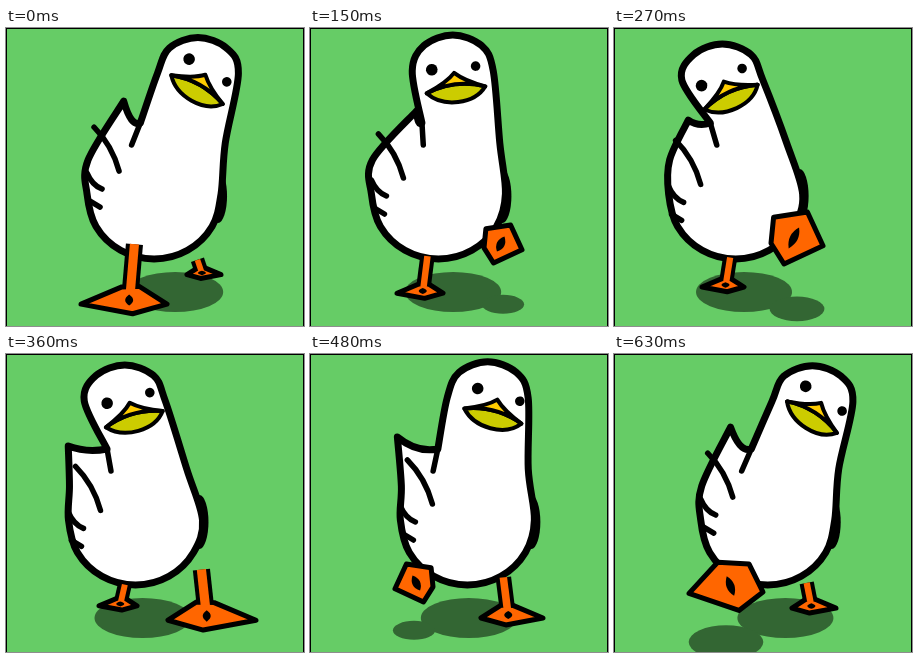
Recreate the animation shown at these times as an HTML page. Size 298 by 298 pixels, loop 0.66 s.

```html
<!DOCTYPE html>
<html lang="en">
<head>
<meta charset="utf-8">
<title>Walking duck</title>
<style>
  html, body { margin: 0; width: 100%; height: 100%; overflow: hidden; background: #66cc66; }
  svg { display: block; width: 100vw; height: 100vh; }
  .line { fill: none; stroke: #000; stroke-width: 5.5; stroke-linecap: round; stroke-linejoin: round; }
</style>
</head>
<body>
<svg id="stage" viewBox="0 0 298 298"></svg>
<script>
const LOOP = 660, HALF = LOOP / 2;
const STEPS = [0, 60, 120, 150, 210, 240, 270, 330, 360, 420, 450, 480, 510, 540, 600, 630];
const ORANGE = '#ff6600', SHADE = '#336633';

// Path of each foot: time, x, y, half length.
const LEFT = [[0, 118, 272, 43], [150, 110, 263, 23], [270, 109, 257, 21], [360, 112, 250, 19],
  [480, 104, 229, 19], [540, 110, 222, 30], [630, 112, 232, 37]];
const RIGHT = [[0, 198, 245, 17], [150, 193, 216, 19], [270, 183, 210, 26], [360, 206, 262, 44],
  [480, 202, 261, 31], [540, 198, 262, 24], [630, 200, 252, 22]];

// Left foot in unit size, on the ground and lifted; the right one is its mirror image.
const FLAT = [[-1, .3], [-.05, -.95], [.35, -1], [1, .3], [.2, 1]];
const PAD = [[-1, .3], [-.4, -1], [.9, -.8], [1, .2], [.5, 1]];

const mix = (a, b, s) => a + (b - a) * s;
const mixPoint = (a, b, s) => a.map((v, k) => mix(v, b[k], s));
const ramp = (v, from, to) => Math.min(1, Math.max(0, (v - from) / (to - from)));

// Once-per-loop swing with an optional twice-per-loop bounce.
const wave = (t, mean, amp, peak, amp2 = 0, peak2 = 0) => mean +
  amp * Math.cos(2 * Math.PI * (t - peak) / LOOP) +
  amp2 * Math.cos(2 * Math.PI * (t - peak2) / HALF);

function along(keys, t) {
  const i = keys.filter(k => k[0] <= t).length - 1;
  const a = keys[i], b = keys[i + 1] || [LOOP, ...keys[0].slice(1)];
  return mixPoint(a, b, ramp(t, a[0], b[0])).slice(1);
}

function arc(cx, cy, rx, ry, start, count) {
  return Array.from({ length: count }, (_, i) => {
    const a = start + Math.PI * i / (count - 1);
    return [cx + rx * Math.cos(a), cy + ry * Math.sin(a)];
  });
}

// Smooth open curve through the points.
function curve(p) {
  let d = 'M' + p[0];
  for (let i = 0; i < p.length - 1; i++) {
    const a = p[Math.max(i - 1, 0)], b = p[i], c = p[i + 1], e = p[Math.min(i + 2, p.length - 1)];
    d += `C${b.map((v, k) => v + (c[k] - a[k]) / 6)} ${c.map((v, k) => v - (e[k] - b[k]) / 6)} ${c}`;
  }
  return d;
}

function lens(x, y, dx, dy, w) {
  const len = Math.hypot(dx, dy), nx = -dy / len * w * 2, ny = dx / len * w * 2;
  return `M${x - dx},${y - dy}Q${x + nx},${y + ny} ${x + dx},${y + dy}Q${x - nx},${y - ny} ${x - dx},${y - dy}Z`;
}

const stage = document.getElementById('stage');
function set(el, attrs) {
  for (const k in attrs) el.setAttribute(k, attrs[k]);
  return el;
}
function add(tag, attrs, parent = stage) {
  return set(parent.appendChild(document.createElementNS('http://www.w3.org/2000/svg', tag)), attrs);
}

add('rect', { width: 298, height: 298, fill: '#66cc66' });
const shade = add('ellipse', { cy: 264, rx: 48, ry: 20, fill: SHADE });
const casts = [1, -1].map(() => add('ellipse', { fill: SHADE }));
const farWing = add('ellipse', { cy: 168, rx: 9, ry: 27 });
const body = add('path', { class: 'line', style: 'fill:#fff;stroke-width:7' });
const marks = add('path', { class: 'line' });

// The face is drawn once around the point between the eyes.
const face = add('g');
add('circle', { cx: -22, r: 5.8 }, face);
add('circle', { cx: 22, r: 4.8 }, face);
add('path', { class: 'line', style: 'fill:#cccc00;stroke-width:4', d: 'M-29 23Q0 11 30 21C18 38-14 39-29 23Z' }, face);
add('path', { class: 'line', style: 'fill:#ffcc00;stroke-width:4', d: 'M-29 23Q-8 14 0 5Q10 14 30 21Q0 11-29 23Z' }, face);

const limbs = [{ side: -1, keys: RIGHT, lag: HALF }, { side: 1, keys: LEFT, lag: 0 }].map((limb, i) => ({
  ...limb,
  cast: casts[i],
  back: add('path', { stroke: '#000' }),
  foot: add('path', { class: 'line', style: `fill:${ORANGE};stroke-width:5` }),
  front: add('path', { stroke: ORANGE }),
  slit: add('path', {})
}));
add('path', { d: 'M0 .5H298M.5 0V298M297.5 0V298', stroke: '#000' });

function drawBody(t) {
  const hx = wave(t, 156, 47, 605, 5, 180), hy = wave(t, 46, 2, 340, 4.5, 265);
  const bx = wave(t, 140, 20, 560, 4, 190);
  const roll = wave(t, 6, 29, 605);
  const neck = [47 + .455 * hx, 95];
  const tail = [bx + wave(t, -46, 27, 100), wave(t, 83, 10, 315)];
  const waist = [(hx + 40 + bx + 67) / 2 - .1 * (hx - 150), 115];

  const edge = [neck, ...arc(hx, hy, 40.5, 36, Math.PI, 5), waist,
    ...arc(bx, 166, 67, 65, 0, 7), [bx - 66, 132], tail];
  const dip = [(tail[0] + neck[0]) / 2 - 1, neck[1] + 4];
  set(body, { d: `${curve(edge)}Q${dip} ${neck}Z` });

  const y = (tail[1] - 83) * .7;
  set(marks, { d: `M${neck}l${-.28 * roll},22` +
    `M${bx - 60},${106 + y}q18,18 25,44M${bx - 67},${152 + y}q5,12 15,16M${bx - 64},${180 + y}l10,6` });
  set(face, { transform: `translate(${hx + wave(t, 6, 7, 560)} ${hy - 3}) rotate(${roll})` });
  set(farWing, { cx: bx + 64 });
  set(shade, { cx: wave(t, 151, 21, 605) });
}

function drawLimb({ side, keys, lag, cast, back, foot, front, slit }, t) {
  const [x, y, size] = along(keys, t);
  const phase = (t + lag) % LOOP;
  const lift = ramp(phase, 390, 470) * (1 - ramp(phase, 600, LOOP));
  const tall = size * mix(.32, 1, lift);
  const shape = FLAT.map((p, i) => mixPoint(p, PAD[i], lift))
    .map(([u, v]) => [x + side * u * size, y + v * tall]);

  // The leg shortens into the foot as it lifts.
  const ankle = mixPoint(shape[1], shape[2], .5);
  ankle[1] += 4;
  const hip = mixPoint([ankle[0] + side * 4, 242 - .6 * size], ankle, Math.min(1, 2 * lift));
  const leg = `M${hip}L${ankle}`, width = 3.5 + .13 * size;
  set(back, { d: leg, 'stroke-width': width + 8 });
  set(foot, { d: `M${shape.join('L')}Z` });
  set(front, { d: leg, 'stroke-width': width });
  set(slit, { d: lens(x + side * .12 * size, y, side * .2 * size * lift, .4 * tall, 4) });

  const grow = Math.min(1, 2 * lift), spread = (.9 * size + 4) * grow;
  set(cast, { cx: x, cy: 264 + .65 * size * grow, rx: spread, ry: spread * .45 });
}

function tick() {
  const now = performance.now() % LOOP;
  const t = STEPS.filter(s => s <= now).pop();
  drawBody(t);
  limbs.forEach(limb => drawLimb(limb, t));
  requestAnimationFrame(tick);
}
tick();
</script>
</body>
</html>
```
